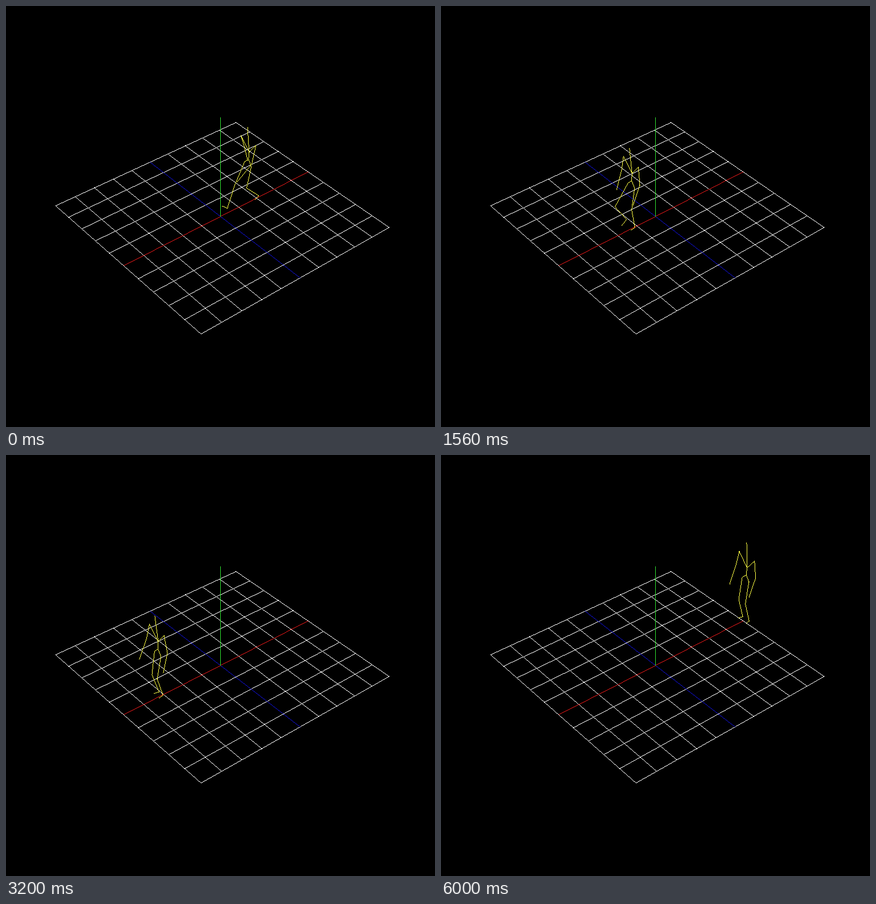
Recreate the animation shown at these times as an HTML page with a canvas. Size 755x741 px, loop 6.1 s.

```html
<!DOCTYPE html>
<html lang="en">
<head>
<meta charset="utf-8">
<title>Walking figure</title>
<style>
html, body { margin: 0; width: 100%; height: 100%; overflow: hidden; background: #000; }
canvas { display: block; }
</style>
</head>
<body>
<canvas id="stage" width="755" height="741"></canvas>
<script>
const { sin, cos, PI, min, max, floor, abs, hypot, sqrt } = Math;
const LOOP = 6100;
const canvas = document.getElementById('stage');
const ctx = canvas.getContext('2d');

// Camera looking at the origin; the floor reaches from -1 to 1, y is up
const TURN = 0.682, TILT = 0.677, DISTANCE = 9.85, ZOOM = 208.6;

function project([x, y, z]) {
  const right = x * cos(TURN) + z * sin(TURN);
  const back = x * sin(TURN) - z * cos(TURN);
  const up = y * cos(TILT) + back * sin(TILT);
  const near = y * sin(TILT) - back * cos(TILT);
  const scale = ZOOM / (1 - near / DISTANCE);
  return [canvas.width / 2 + right * scale, canvas.height / 2 - up * scale];
}

// One-pixel line without smoothing
function line(c, from, to) {
  let a = project(from), b = project(to);
  const m = abs(b[0] - a[0]) > abs(b[1] - a[1]) ? 0 : 1;
  if (a[m] > b[m]) [a, b] = [b, a];
  const slope = (b[1 - m] - a[1 - m]) / (b[m] - a[m] || 1);
  for (let p = floor(a[m]); p <= floor(b[m]); p++) {
    const q = floor(a[1 - m] + (p + 0.5 - a[m]) * slope);
    if (m) c.fillRect(q, p, 1, 1);
    else c.fillRect(p, q, 1, 1);
  }
}

const chain = (c, ...points) => points.slice(1).forEach((p, i) => line(c, points[i], p));

function makeBackdrop() {
  const layer = document.createElement('canvas');
  layer.width = canvas.width;
  layer.height = canvas.height;
  const c = layer.getContext('2d');
  c.fillRect(0, 0, layer.width, layer.height);
  const alongX = z => line(c, [-1, 0, z], [1, 0, z]);
  const alongZ = x => line(c, [x, 0, -1], [x, 0, 1]);
  c.fillStyle = '#fff';
  for (let i = -5; i <= 5; i++) {
    if (i === 0) continue;
    alongX(i / 5);
    alongZ(i / 5);
  }
  c.fillStyle = '#e01818';
  alongX(0);
  c.fillStyle = '#1010d8';
  alongZ(0);
  c.fillStyle = '#30e030';
  line(c, [0, 0, 0], [0, 1, 0]);
  return layer;
}

const clamp = u => min(1, max(0, u));
const smooth = u => u * u * (3 - 2 * u);
const steady = u => u;

// Value at time n along a few [time, value] points
function track(points, n, ease) {
  const k = points.findIndex(p => p[0] > n);
  if (k < 0) return points[points.length - 1][1];
  const [n0, a] = points[k - 1], [n1, b] = points[k];
  return a + (b - a) * ease((n - n0) / (n1 - n0));
}

const PACE = [[0, 0.295], [23, -0.099], [44, -0.392], [56, -0.582], [66, -0.64], [80, -0.648]];
const SWING = [[0, -1], [23, 1], [44, -1], [57, 0.85], [72, 0]];
const RESTART = 98, WAY_BACK = 1.648;

// A foot moves from x0 to x1 between two times and is planted otherwise
const farSteps = [{ n0: 21, n1: 46, x0: 0.11, x1: -0.613 }];
const nearSteps = [
  { n0: -2, n1: 20, x0: 0.43, x1: -0.23 },
  { n0: 42, n1: 63, x0: -0.23, x1: -0.613 }
];

function footAt(steps, n) {
  const s = steps.findLast(step => n >= step.n0) || steps[0];
  const u = clamp((n - s.n0) / (s.n1 - s.n0));
  return { x: s.x0 + (s.x1 - s.x0) * smooth(u), air: sin(PI * u) };
}

// Knee between hip and ankle, bent forwards
function knee(hip, ankle) {
  const dx = ankle[0] - hip[0], dy = ankle[1] - hip[1], d = hypot(dx, dy);
  const bend = sqrt(max(0, 0.224 ** 2 - d * d / 4));
  return [(hip[0] + ankle[0]) / 2 + dy / d * bend,
    (hip[1] + ankle[1]) / 2 - dx / d * bend,
    (hip[2] + ankle[2]) / 2];
}

const add = ([x, y, z], dx, dy, dz = 0) => [x + dx, y + dy, z + dz];
const hang = (p, length, angle, out) => add(p, -length * sin(angle), -length * cos(angle), out);

function drawFigure(n) {
  const ready = n >= RESTART;
  const shift = ready ? WAY_BACK : 0;
  const bob = 1 - smooth(clamp((n - 56) / 14));
  const hips = [track(PACE, n, steady) + shift, 0.443 - bob * (0.013 + 0.018 * cos(2 * PI * n / 22.5)), 0];
  const pelvis = add(hips, 0.005, 0.048);
  const neck = add(pelvis, 0.005, 0.07);
  const swing = track(SWING, n, smooth);

  chain(ctx, add(neck, -0.022, 0.26), neck, pelvis);

  const arm = (side, s) => {
    const shoulder = add(neck, -0.01, 0.122, side * 0.095);
    const elbow = hang(shoulder, 0.155, 0.03 + 0.42 * s, side * 0.03);
    chain(ctx, neck, shoulder, elbow, hang(elbow, 0.185, 0.35 + 0.6 * s, 0));
  };
  arm(-1, swing);
  arm(1, -swing);

  const leg = (side, steps, z, toeOut) => {
    const hip = add(hips, 0, 0, side * 0.043);
    const foot = footAt(steps, n);
    const ankle = [foot.x + shift, 0.005 + 0.075 * foot.air, z];
    const pitch = 0.55 * max(0, hip[0] - ankle[0] - 0.11) - 0.05 * foot.air;
    chain(ctx, pelvis, hip, knee(hip, ankle), ankle, add(ankle, -0.053, 0.01 + pitch, toeOut));
  };
  leg(-1, farSteps, -0.044, 0);
  leg(1, nearSteps, ready ? 0.04 : 0.01, 0.018);
}

// Steps come in threes: two short, one long, 140 ms in all
function stepAt(ms) {
  const t = min(ms, 6000) + 20, r = t % 140;
  return 3 * floor(t / 140) + (r < 20 ? 0 : r < 40 ? 1 : 2) - 1;
}

const backdrop = makeBackdrop();
const start = performance.now();
let shown = -1;

function tick() {
  const n = stepAt((performance.now() - start) % LOOP);
  if (n !== shown) {
    shown = n;
    ctx.drawImage(backdrop, 0, 0);
    ctx.fillStyle = '#ff4';
    drawFigure(n);
  }
  requestAnimationFrame(tick);
}
tick();
</script>
</body>
</html>
```
